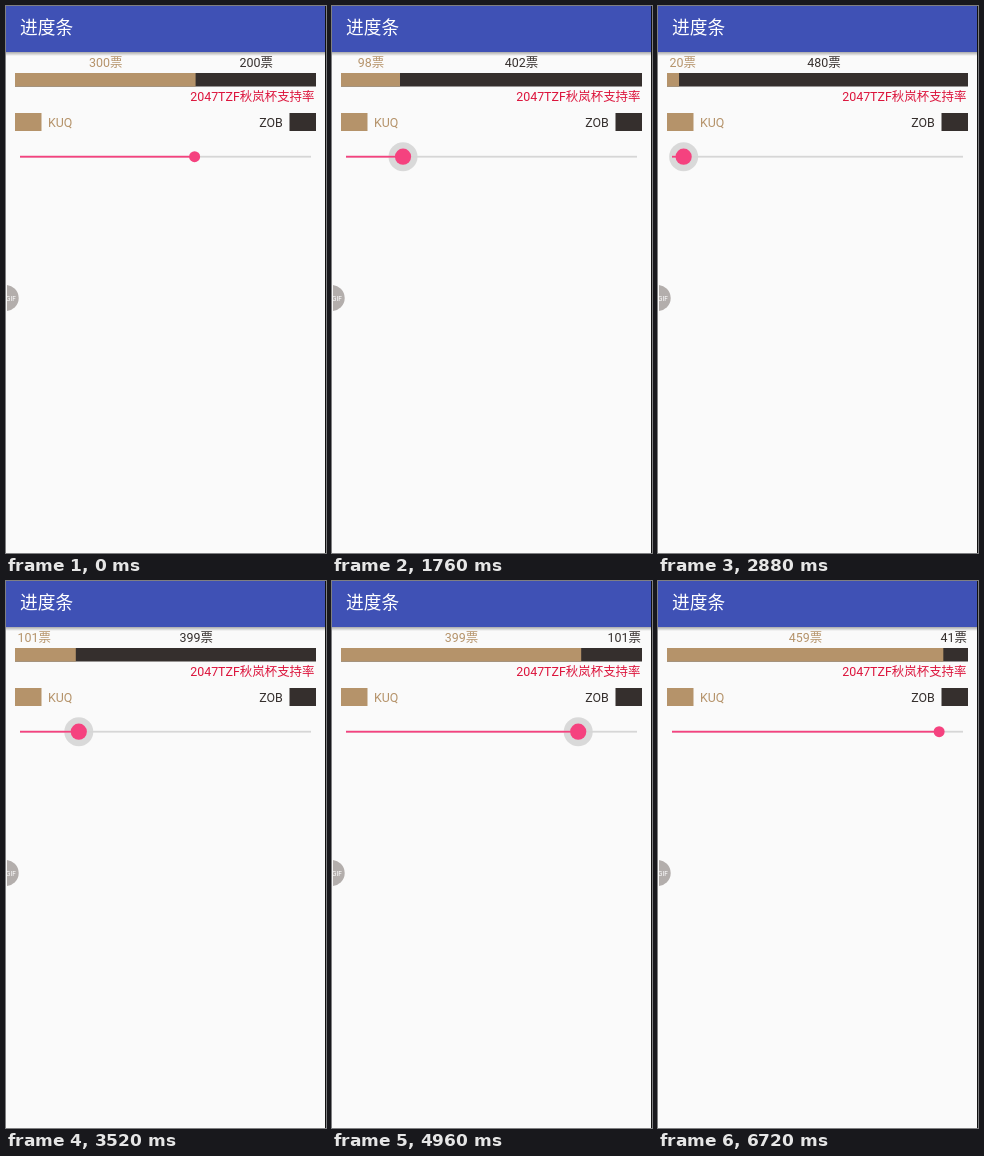
Recreate the animation shown at these times as an HTML page. Size 320 by 547 pixels, loop 7200 ms.

```html
<!DOCTYPE html>
<html lang="zh-CN">
<head>
<meta charset="utf-8">
<title>进度条</title>
<style>
  html, body { margin: 0; width: 100%; height: 100%; overflow: hidden; background: #fafafa; }
  svg { display: block; width: 100%; height: 100%; }
  text { font: 12.44px Roboto, "Noto Sans CJK SC", "Noto Sans CJK", sans-serif; }
  .title { font-size: 17.7px; fill: #fff; }
  .badge { font-size: 6.5px; fill: #fff; }
  .tan { fill: #b5936a; }
  .dark { fill: #352f2d; }
  .red { fill: #dc143c; }
  .pink { fill: #f5427f; }
  .end { text-anchor: end; }
</style>
</head>
<body>
<svg viewBox="0 0 320 547">
  <defs>
    <linearGradient id="shade" x1="0" y1="0" x2="0" y2="1">
      <stop offset="0" stop-color="#000" stop-opacity=".32"/>
      <stop offset="1" stop-color="#000" stop-opacity="0"/>
    </linearGradient>
    <clipPath id="edge"><rect x="1" y="270" width="20" height="44"/></clipPath>
  </defs>
  <rect width="320" height="547" fill="#fafafa"/>
  <rect y="46" width="320" height="4" fill="url(#shade)"/>
  <rect width="320" height="46" fill="#3f51b5"/>
  <text class="title" x="14" y="28.2">进度条</text>

  <text id="leftVotes" class="tan" y="61.4"></text>
  <text id="rightVotes" class="dark" y="61.4"></text>
  <rect class="dark" x="9" y="67" width="301" height="13.5"/>
  <rect id="leftBar" class="tan" x="9" y="67" height="13.5"/>

  <text class="red end" x="308.5" y="95.4">2047TZF秋岚杯支持率</text>
  <rect class="tan" x="9" y="107" width="26.5" height="18"/>
  <text class="tan" x="42" y="121.2">KUQ</text>
  <text class="dark end" x="276.8" y="121.2">ZOB</text>
  <rect class="dark" x="283.5" y="107" width="26.5" height="18"/>

  <circle id="halo" cy="150.7" fill="#000"/>
  <rect x="14" y="149.8" width="291" height="1.8" fill="#d6d6d6"/>
  <rect id="track" class="pink" x="14" y="149.8" height="1.8"/>
  <circle id="thumb" class="pink" cy="150.7"/>

  <g clip-path="url(#edge)">
    <circle cx="-.5" cy="292" r="13.2" fill="#b3aeac"/>
    <text class="badge" x="0" y="294.6">GIF</text>
  </g>
  <rect x="319" width="1" height="547" fill="#111"/>
</svg>
<script>
const LOOP = 7200, TICK = 160, TOTAL = 500;
const BAR = { x: 9, w: 301 }, TRACK = { x: 14, w: 291 };

// [time in ms, value]
const VOTES = [[480, 300], [1120, 207], [1760, 98], [2240, 28], [2560, 8], [2880, 20],
  [3520, 101], [4960, 399], [5440, 450], [5760, 459]];
const PRESS = [[160, 0], [480, 1], [6400, 1], [6720, 0]];

const el = id => document.getElementById(id);
const set = (node, attrs) => {
  for (const key in attrs) node.setAttribute(key, attrs[key]);
};
const leftVotes = el('leftVotes'), rightVotes = el('rightVotes'), leftBar = el('leftBar');
const halo = el('halo'), track = el('track'), thumb = el('thumb');

function sample(points, t) {
  const i = points.findIndex(p => p[0] >= t);
  if (i === 0) return points[0][1];
  if (i < 0) return points[points.length - 1][1];
  const [t0, v0] = points[i - 1], [t1, v1] = points[i];
  return v0 + (v1 - v0) * (t - t0) / (t1 - t0);
}

// Centres a label over its bar; a short bar pins it to the outer edge.
function place(label, votes, start, width, pinned) {
  label.textContent = votes + '票';
  const size = label.getComputedTextLength();
  const gap = (width - size) / 2;
  label.setAttribute('x', gap < 15 ? pinned(size) : start + gap + .4);
}

function draw(t) {
  const votes = Math.round(sample(VOTES, t));
  const press = sample(PRESS, t);
  const share = votes / TOTAL;
  const barWidth = BAR.w * share, x = TRACK.x + TRACK.w * share;

  place(leftVotes, votes, BAR.x, barWidth, () => 11.5);
  place(rightVotes, TOTAL - votes, BAR.x + barWidth, BAR.w - barWidth, size => 309 - size);
  set(leftBar, { width: barWidth });
  set(track, { width: TRACK.w * share });
  set(thumb, { cx: x, r: 5.5 + 2.6 * press });
  set(halo, { cx: x, r: 8 + 6.5 * press, 'fill-opacity': .13 * press });
}

const begin = performance.now();
function loop() {
  const t = (performance.now() - begin) % LOOP;
  draw(Math.floor(t / TICK) * TICK);
  requestAnimationFrame(loop);
}
loop();
</script>
</body>
</html>
```
